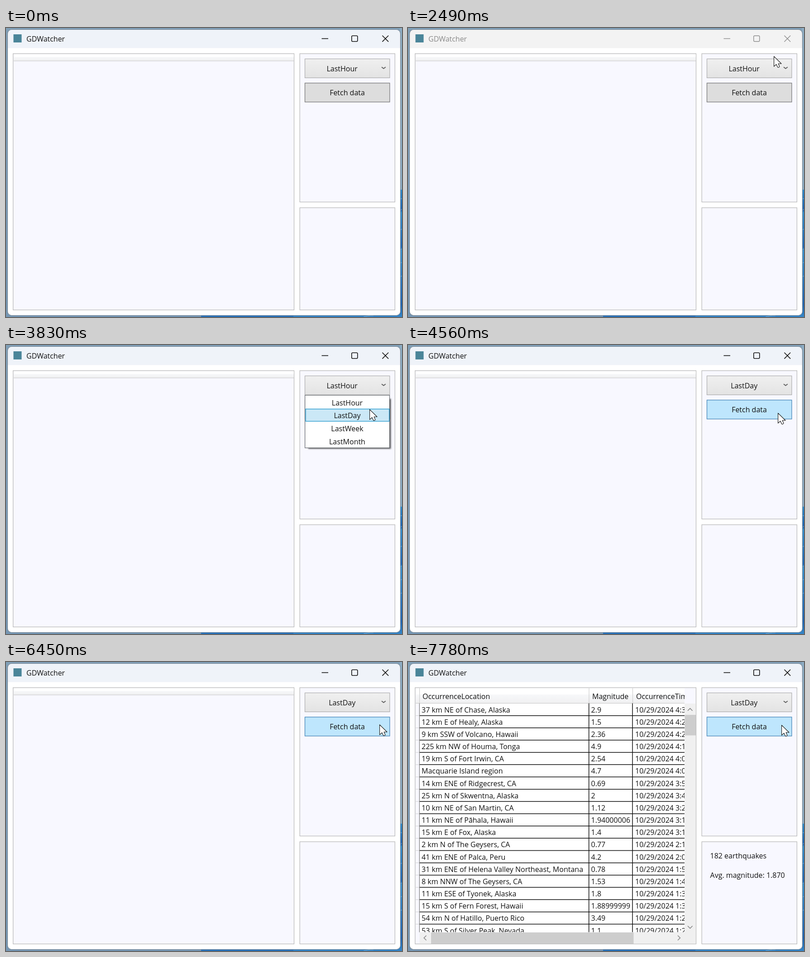
Write an HTML page that moves like this. It is 875 px wide and 640 px high and loops after 8000 ms.

```html
<!DOCTYPE html>
<html lang="en">
<head>
<meta charset="utf-8">
<title>Window demo</title>
<style>
  html, body { margin: 0; width: 100%; height: 100%; overflow: hidden; background: #86a4bd; }
  svg { display: block; width: 875px; height: 640px; }
  text { font: 16px "Open Sans", "Noto Sans", sans-serif; fill: #111; white-space: pre; }
  .mid { text-anchor: middle; }
  .panel { fill: #f8f8ff; stroke: #bababa; stroke-width: 1.3; }
  .glyph { fill: none; stroke: #606060; stroke-width: 1.6; }
</style>
</head>
<body>
<svg viewBox="0 0 875 640" xmlns="http://www.w3.org/2000/svg">
  <defs>
    <linearGradient id="left" x2="0" y2="1">
      <stop offset="0" stop-color="#809fb7"/><stop offset=".5" stop-color="#7e9db9"/><stop offset="1" stop-color="#7596b3"/>
    </linearGradient>
    <linearGradient id="right" x2="0" y2="1">
      <stop offset="0" stop-color="#2e8ccd"/><stop offset=".1" stop-color="#2273bd"/>
      <stop offset=".16" stop-color="#1c61b0"/><stop offset=".18" stop-color="#3691cf"/>
      <stop offset=".45" stop-color="#2068b5"/><stop offset=".48" stop-color="#3a93d1"/>
      <stop offset=".9" stop-color="#1f63b1"/><stop offset="1" stop-color="#2f84c7"/>
    </linearGradient>
    <linearGradient id="face" x2="0" y2="1">
      <stop offset="0" stop-color="#f0f0f0"/><stop offset="1" stop-color="#e3e3e3"/>
    </linearGradient>
    <linearGradient id="faceHot" x2="0" y2="1">
      <stop offset="0" stop-color="#ecf4fc"/><stop offset="1" stop-color="#dcecfc"/>
    </linearGradient>
    <linearGradient id="head" x2="0" y2="1">
      <stop offset="0" stop-color="#fff"/><stop offset=".4" stop-color="#fff"/>
      <stop offset=".42" stop-color="#f7f8fa"/><stop offset="1" stop-color="#f0f0f1"/>
    </linearGradient>
    <filter id="blur" x="-10%" y="-10%" width="120%" height="120%"><feGaussianBlur stdDeviation="1.5"/></filter>
    <clipPath id="win"><rect x="3.5" y="3.5" width="868" height="633" rx="9"/></clipPath>
    <clipPath id="grid"><rect x="17" y="58" width="594.5" height="540.5"/></clipPath>
    <clipPath id="drop"><rect id="dropClip" x="655" y="110.5" width="205" height="0"/></clipPath>
  </defs>

  <rect width="875" height="640" fill="url(#left)"/>
  <rect x="870" y="0" width="5" height="358" fill="#8dacc3"/>
  <rect x="870" y="358" width="5" height="282" fill="url(#right)"/>
  <rect x="431" y="634" width="204" height="6" fill="#2a72b8"/>
  <rect x="635" y="634" width="240" height="6" fill="#3483c5"/>
  <path d="M790 640q8-3 22-3M870 378h5M870 405l5-4M870 448l5-3M870 492l5-3M870 521l5-2M870 551l5-2" fill="none" stroke="#7ab6e0" stroke-width="1"/>

  <g clip-path="url(#win)">
    <rect width="875" height="640" fill="#fff"/>
    <rect id="bar" width="875" height="44.5"/>
  </g>
  <rect x="3.5" y="3.5" width="868" height="633" rx="9" fill="none" stroke="#7c8a97" stroke-width="1.2"/>
  <rect x="16.5" y="14" width="18" height="18" fill="#4a8599"/>
  <text id="name" x="45" y="29.5">GDWatcher</text>
  <g id="caps" fill="none">
    <path d="M697.5 23.5h14.5"/>
    <rect x="763.8" y="17.2" width="13" height="12.6" rx="2"/>
    <path d="M831.5 16.8l13.6 13.6M845.1 16.8l-13.6 13.6"/>
  </g>

  <rect class="panel" x="15.7" y="56.8" width="620.8" height="567.6"/>
  <rect class="panel" x="649.2" y="56.8" width="210.2" height="328.6"/>
  <rect class="panel" x="649.2" y="398" width="210.2" height="226.4"/>
  <g id="empty">
    <rect x="17" y="58" width="619" height="14.5" fill="url(#head)"/>
    <path d="M17 72.8h619" stroke="#cfcfcf" stroke-width="1.2"/>
  </g>
  <g id="data"></g>

  <rect id="combo" x="660.5" y="68.4" width="187.4" height="42"/>
  <text id="choice" class="mid" x="742.7" y="96.3"></text>
  <path class="glyph" d="M830 86.6l4.4 3.2 4.4-3.2" style="stroke-width:1.9"/>
  <rect id="button" x="660.5" y="121.9" width="187.4" height="42"/>
  <text class="mid" x="754" y="149">Fetch data</text>

  <g id="popup" clip-path="url(#drop)">
    <rect x="668" y="119" width="182.5" height="111" fill="#000" opacity=".6" filter="url(#blur)"/>
    <rect x="660.6" y="111.2" width="187" height="116.6" fill="#fff" stroke="#606468" stroke-width="1.2"/>
    <rect id="pick" x="662.2" width="184.6" height="27.2" fill="#cbe8f6" stroke="#2a9bd0" stroke-width="1.4"/>
    <g id="items"></g>
  </g>

  <path id="cursor" d="M.6 .8V23.2L5.8 18.5 8.7 24.6Q9.2 25.7 10.3 25.2L12.2 24.4Q13.3 23.9 12.8 22.8L10.2 17H17Z" fill="#fff" stroke="#111" stroke-width="1.1" stroke-linejoin="round"/>
</svg>
<script>
const $ = id => document.getElementById(id);
const LOOP = 8000, STEP = 67.1;

const options = ["LastHour", "LastDay", "LastWeek", "LastMonth"];
const PITCH = 28.7;
$("items").innerHTML = options.map((s, i) =>
  `<text class="mid" x="754" y="${133.5 + i * PITCH}">${s}</text>`).join("");

const quakes = `37 km NE of Chase, Alaska|2.9|4:35
12 km E of Healy, Alaska|1.5|4:28
9 km SSW of Volcano, Hawaii|2.36|4:22
225 km NW of Houma, Tonga|4.9|4:14
19 km S of Fort Irwin, CA|2.54|4:06
Macquarie Island region|4.7|4:01
14 km ENE of Ridgecrest, CA|0.69|3:52
25 km N of Skwentna, Alaska|2|3:44
10 km NE of San Martin, CA|1.12|3:25
11 km NE of Pāhala, Hawaii|1.94000006|3:17
15 km E of Fox, Alaska|1.4|3:11
2 km N of The Geysers, CA|0.77|2:15
41 km ENE of Palca, Peru|4.2|2:03
31 km ENE of Helena Valley Northeast, Montana|0.78|1:54
8 km NNW of The Geysers, CA|1.53|1:46
11 km ESE of Tyonek, Alaska|1.8|1:38
15 km S of Fern Forest, Hawaii|1.88999999|1:31
54 km N of Hatillo, Puerto Rico|3.49|1:27
53 km S of Silver Peak, Nevada|1.1|1:22`.split("\n").map(r => r.split("|"));

const text = (x, y, s) => `<text x="${x}" y="${y}">${s}</text>`;
const box = (x, y, w, h, fill) => `<rect x="${x}" y="${y}" width="${w}" height="${h}" fill="${fill}"/>`;
const line = (d, color, w = 1.5) => `<path d="${d}" stroke="${color}" stroke-width="${w}" fill="none"/>`;

function buildTable() {
  const ROW = 27.17, TOP = 91.5;
  let s = box(17, 58, 594, 33.5, "url(#head)") + box(25.5, TOP, 586, 507, "#fff");
  s += line("M25.5 58V91M400 58V91M496.5 58V91M17 91.3H611", "#cdcdcd", 1.2);
  s += text(32, 82, "OccurrenceLocation") + text(407, 82, "Magnitude") + text(504, 82, "OccurrenceTime");
  quakes.forEach(([place, size, time], i) => {
    const y = TOP + i * ROW, base = y + 20;
    s += text(30, base, place) + text(404.5, base, size) + text(502, base, "10/29/2024 " + time);
    s += line(`M25.5 ${y + ROW}H611.5`, "#111") + line(`M17 ${y + ROW}H25`, "#d0d0d0", 1);
  });
  s += line("M399.7 91.5V599M496 91.5V599", "#111") + line("M25.3 91.5V599", "#777", 1.2);
  let bars = box(611, 92, 25, 532, "#f0f0f0") + box(25.5, 598.5, 586, 25.5, "#f0f0f0");
  bars += box(611.5, 117, 24.5, 45.5, "#cdcdcd") + box(51, 599, 447.5, 25, "#cdcdcd");
  bars += `<path class="glyph" d="M618 108l5.3-5.3 5.3 5.3M618 584.5l5.3 5.3 5.3-5.3M40.5 605.7l-5.3 5.3 5.3 5.3M596 605.7l5.3 5.3-5.3 5.3" style="stroke:#858585"/>`;
  $("data").innerHTML = `<g clip-path="url(#grid)">${s}</g>${bars}`
    + text(667.5, 434.5, "182 earthquakes") + text(667.5, 477.5, "Avg. magnitude: 1.870");
}
buildTable();

// pointer path: time, x, y
const path = [
  [67, 573, 645], [200, 566, 585], [400, 550, 443], [600, 550, 443], [740, 543, 370],
  [930, 528, 244], [1130, 528, 244], [1200, 502, 256], [1900, 502, 256],
  [2080, 545, 226], [2210, 680, 130], [2350, 782, 50], [2483, 808, 62],
  [2570, 840, 76], [2680, 825, 87], [3420, 825, 87], [3550, 823, 100],
  [3690, 812, 143], [3770, 806, 150], [3890, 800, 133], [4360, 800, 133],
  [4415, 817, 141], [4500, 817, 141], [4555, 817, 150], [5310, 817, 150],
  [5500, 819, 172], [5710, 821, 186], [6000, 821, 186], [6240, 823, 160],
  [6440, 825, 138], [7530, 825, 138], [7580, 825, 139], [8000, 825, 139]
];

function pointer(t) {
  const q = Math.floor((t + 12) / STEP) * STEP;
  const i = path.findIndex(p => p[0] > q);
  if (i < 0) return path[path.length - 1].slice(1);
  if (i === 0) return path[0].slice(1);
  const a = path[i - 1], b = path[i], k = (q - a[0]) / (b[0] - a[0]);
  return [1, 2].map(n => Math.round(a[n] + (b[n] - a[n]) * k));
}

function set(id, attrs) {
  for (const k in attrs) $(id).setAttribute(k, attrs[k]);
}
const show = (id, on) => set(id, { visibility: on ? "visible" : "hidden" });

function draw(t) {
  const [x, y] = pointer(t);
  set("cursor", { transform: `translate(${x} ${y})` });
  show("cursor", t >= 70);

  const active = t < 70 || t >= 2750;
  set("bar", { fill: active ? "#eff3f9" : "#f3f3f3" });
  $("name").style.fill = active ? "#111" : "#8a8a8a";
  set("caps", { stroke: active ? "#111" : "#8c8c8c", "stroke-width": active ? 1.6 : 1.4 });

  const hot = t >= 2550 && t < 3620;
  set("combo", { fill: hot ? "url(#faceHot)" : "url(#face)", stroke: hot ? "#7eb4ea" : "#acacac", "stroke-width": 1.2 });
  $("choice").textContent = options[t < 4560 ? 0 : 1];

  const over = t >= 4560 && y < 164, down = t >= 7050 && t < 7120;
  set("button", {
    fill: down ? "#c4e5f6" : over ? "#bee6fd" : "#dddddd",
    stroke: down ? "#2c628b" : over ? "#3c7fb1" : "#707070",
    "stroke-width": 1.2
  });

  show("popup", t >= 2820 && t < 4560);
  const open = Math.min(1, Math.max(0, (t - 2790) / 170));
  set("dropClip", { height: 125 * open });
  set("pick", { y: 113 + (t < 3690 ? 0 : PITCH) });

  const loaded = t >= 7780;
  show("data", loaded);
  show("empty", !loaded);
}

const start = performance.now();
function tick(now) {
  draw(Math.max(0, now - start) % LOOP);
  requestAnimationFrame(tick);
}
draw(0);
requestAnimationFrame(tick);
</script>
</body>
</html>
```
